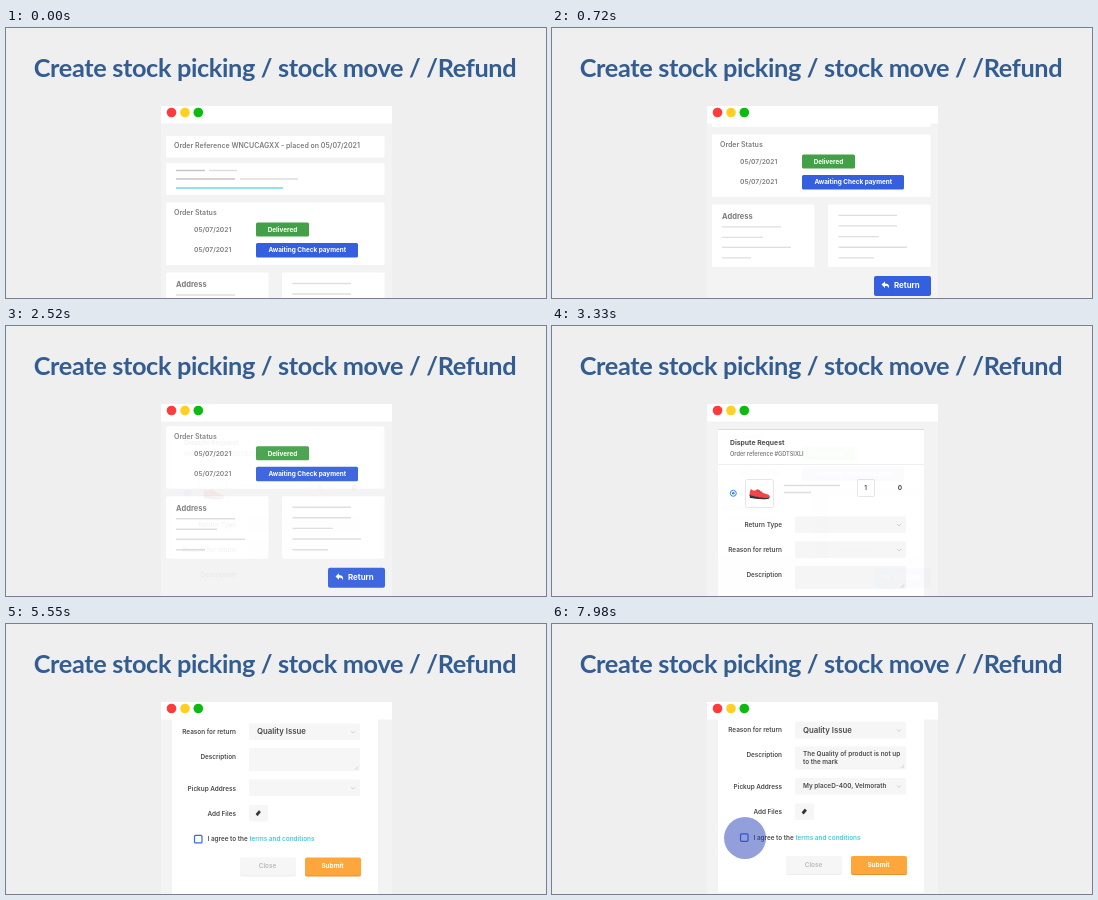
Write an HTML page that moves like this. It is 540 by 270 pixels and loops after 8 s.

```html
<!DOCTYPE html>
<html lang="en">
<head>
<meta charset="utf-8">
<title>Return request</title>
<style>
  html, body { margin: 0; width: 100%; height: 100%; overflow: hidden; background: #efefef; }
  svg { display: block; width: 100%; height: 100%; }
  text { font: 600 6.4px Inter, "Open Sans", sans-serif; fill: #4a4a4a; }
  .title { font: 700 25.3px Lato, sans-serif; letter-spacing: -.35px; fill: #335c91; text-anchor: middle; }
  .grey { fill: #7d7d7d; }
  .head { font-size: 7px; }
  .bold { font-weight: 700; }
  .white { fill: #fff; font-weight: 700; }
  .mid { text-anchor: middle; }
  .end { text-anchor: end; }
  .value { font-size: 7.8px; }
  .card { fill: #fff; }
  .field { fill: #f6f6f6; }
  .box { fill: #fff; stroke: #e6e6e6; }
  .line { stroke: #dedede; stroke-width: 1.4; fill: none; }
  .dark { stroke: #c6c6c6; }
  .thin { stroke: #c9c9c9; stroke-width: .8; fill: none; }
</style>
</head>
<body>
<svg viewBox="0 0 540 270">
  <defs>
    <clipPath id="view"><rect x="155" y="95" width="231" height="175"/></clipPath>
    <path id="chevron" class="thin" d="M-2 -1L0 1L2 -1"/>
  </defs>
  <rect width="540" height="270" fill="#efefef"/>
  <text class="title" x="269" y="49">Create stock picking / stock move / /Refund</text>
  <rect x="155" y="78" width="231" height="192" fill="#f3f3f3"/>

  <g clip-path="url(#view)">
    <g id="order">
      <rect class="card" x="160" y="108" width="218.500" height="21.500" rx="1.500"/>
      <text class="grey head" x="168" y="120.500">Order Reference WNCUCAGXX - placed on 05/07/2021</text>
      <rect class="card" x="160" y="135" width="218.500" height="32" rx="1.500"/>
      <path class="line dark" d="M170 142.500H199M170 151H229"/>
      <path class="line" d="M203 142.500H231M234 151H292"/>
      <path class="line" style="stroke:#6fd3ea" d="M170 160H277"/>

      <rect class="card" x="160" y="174.500" width="218.500" height="62.500" rx="1.500"/>
      <text class="grey head" x="168" y="187.500">Order Status</text>
      <text class="grey" style="font-size:6.7px" x="188" y="204">05/07/2021</text>
      <text class="grey" style="font-size:6.7px" x="188" y="224.500">05/07/2021</text>
      <rect x="250" y="194.500" width="53" height="14" rx="1.500" fill="#43a047"/>
      <text class="white mid" x="276.500" y="204">Delivered</text>
      <rect x="250" y="215" width="102" height="14.500" rx="1.500" fill="#345fde"/>
      <text class="white mid" x="301.300" y="224.500">Awaiting Check payment</text>

      <rect class="card" x="160" y="244.500" width="102.500" height="62.500" rx="1.500"/>
      <text class="grey bold" style="font-size:7.5px" x="170" y="259">Address</text>
      <path class="line" d="M170 267H229M170 277.500H211M170 287.500H239M170 298H199"/>
      <rect class="card" x="276" y="244.500" width="102.500" height="62.500" rx="1.500"/>
      <path class="line" d="M286.500 255.500H345M286.500 266H345M286.500 276.700H327M286.500 287.300H355M286.500 298H322"/>

      <rect x="322" y="316" width="57" height="20" rx="2" fill="#345fde"/>
      <path d="M329.500 324.700L333 321.500V323.500C336.500 323.500 338 325.500 336.500 328.500C336.500 326.500 335.500 326 333 326V328Z" fill="#fff"/>
      <text class="white" style="font-size:7.9px" x="342" y="328.500">Return</text>
    </g>

    <g id="disputeFade" opacity="0">
      <rect x="155" y="95" width="231" height="175" fill="#f3f3f3"/>
      <g id="dispute">
        <rect class="card" x="166" y="103" width="206" height="283" rx="1"/>
        <path d="M166 103.500H372" stroke="#dcdcdc" stroke-width="1.200"/>
        <text class="bold" style="font-size:6.8px" x="178" y="119">Dispute Request</text>
        <text class="grey" style="font-size:5.6px" x="178" y="130">Order reference #GDTSIXLI</text>
        <path d="M166 138.500H372" stroke="#eee"/>

        <circle cx="181.300" cy="167.300" r="3" fill="#fff" stroke="#2f86f0"/>
        <circle cx="181.300" cy="167.300" r="1.300" fill="#2f86f0"/>
        <rect class="box" x="193.500" y="153.500" width="28" height="28" rx="2"/>
        <path d="M197.500 168.500C198 166 198 164 199 163C201 165 203 165 205.500 163C208 165 211 167.500 216 168.500C218 169.500 218 171 217.500 171.500H207L197.500 169.500Z" fill="#ef4444"/>
        <path d="M197.500 169C202 170 206 172 217.700 171.200C217.500 173 215 173.200 211 173.200C205 173 201 172.500 198 172Z" fill="#343038"/>
        <path d="M205.500 165.500L208 164.300M207.300 167L210 165.700" stroke="#b9323a" stroke-width=".7"/>
        <path class="line" d="M232 159.500H288M232 166.500H259"/>
        <rect class="box" x="305.500" y="153.500" width="17" height="17" rx="1.500"/>
        <text class="mid" x="313.500" y="164.300">1</text>
        <text class="mid bold" x="348" y="164.300">0</text>

        <text class="end" x="230" y="200.800">Return Type</text>
        <rect class="field" x="243" y="190.500" width="111" height="16.500" rx="1.500"/>
        <use href="#chevron" x="347" y="199"/>
        <text class="end" x="230" y="225.800">Reason for return</text>
        <rect class="field" x="243" y="215.300" width="111" height="16.700" rx="1.500"/>
        <use href="#chevron" x="347" y="224"/>
        <text class="end" x="230" y="250.800">Description</text>
        <rect class="field" x="243" y="240" width="111" height="23" rx="1.500"/>
        <path class="thin" d="M349 261.500L352 258.500M351 261.500L352 260.500"/>
        <text class="end" x="230" y="282.500">Pickup Address</text>
        <rect class="field" x="243" y="271.500" width="111" height="16.500" rx="1.500"/>
        <use href="#chevron" x="347" y="280"/>
        <text class="end" x="230" y="307.500">Add Files</text>
        <rect class="field" x="243" y="297" width="19" height="16.500" rx="1.500"/>
        <path d="M250.500 306L253 303M251.500 307L254 304" stroke="#333" stroke-width="1.500" stroke-linecap="round"/>

        <g id="values">
          <text class="value" x="251" y="201.300">Refund</text>
          <text class="value" x="251" y="226.300">Quality Issue</text>
          <text x="251" y="249.500">The Quality of product is not up<tspan x="251" dy="7.500">to the mark</tspan></text>
          <text x="251" y="281.700">My placeD-400, Velmorath</text>
        </g>

        <rect x="188.500" y="327.300" width="7.500" height="7.500" rx="1" fill="#fff" stroke="#2f6fe0" stroke-width="1.200"/>
        <text x="201.500" y="333">I agree to the <tspan fill="#3fcbdd">terms and conditions</tspan></text>
        <rect x="234" y="350.500" width="56" height="18" rx="2" fill="#ececec"/>
        <rect x="234" y="349.500" width="56" height="18" rx="2" fill="#f6f6f6"/>
        <text class="mid" style="fill:#b9b9b9" x="261.500" y="360">Close</text>
        <rect x="299" y="350.500" width="56" height="18" rx="2" fill="#e8902c"/>
        <rect x="299" y="349.500" width="56" height="18" rx="2" fill="#fda63c"/>
        <text class="white mid" x="326.500" y="360">Submit</text>
      </g>
    </g>
    <circle id="tap" fill="#2840b8" r="0"/>
  </g>

  <rect x="155" y="78" width="231" height="17.500" fill="#fff"/>
  <circle cx="165.500" cy="84.500" r="4.800" fill="#ff3b3b"/>
  <circle cx="179" cy="84.500" r="4.800" fill="#ffd023"/>
  <circle cx="192.300" cy="84.500" r="4.800" fill="#0bbb0f"/>
</svg>
<script>
  const LOOP = 8000;
  const byId = id => document.getElementById(id);
  const order = byId("order");
  const dispute = byId("dispute"), disputeFade = byId("disputeFade");
  const values = [...byId("values").children];
  const tap = byId("tap");

  const progress = (t, from, to) => Math.min(1, Math.max(0, (t - from) / (to - from)));
  const smooth = p => p * p * (3 - 2 * p);
  const easeOut = p => 1 - (1 - p) ** 2;

  // cubic-bezier(.4, 0, .05, 1)
  function glide(x) {
    let lo = 0, hi = 1;
    for (let i = 0; i < 24; i++) {
      const s = (lo + hi) / 2, r = 1 - s;
      if (1.2 * r * r * s + 0.15 * r * s * s + s ** 3 < x) lo = s; else hi = s;
    }
    return smooth(lo);
  }

  const valueTimes = [[3720, 3960], [3900, 4170], [5790, 6060], [6000, 6300]];
  const taps = [
    { x: 350, y: 252, start: 1950, end: 2430 },
    { x: 193, y: 214, start: 7740, end: 8300 }
  ];

  function draw(t) {
    order.setAttribute("transform", `translate(0 ${-74.3 * glide(progress(t, 0, 1190))})`);
    dispute.setAttribute("transform", `translate(0 ${-117.5 * glide(progress(t, 4778, 5720))})`);
    disputeFade.setAttribute("opacity", smooth(progress(t, 2370, 3420)));

    values.forEach((value, i) => {
      const p = easeOut(progress(t, ...valueTimes[i]));
      value.setAttribute("opacity", p);
      value.setAttribute("transform", `translate(0 ${4 * (1 - p)})`);
    });

    const { x, y, start, end } = taps[t < 4000 ? 0 : 1];
    tap.setAttribute("cx", x);
    tap.setAttribute("cy", y);
    tap.setAttribute("r", 21 * easeOut(progress(t, start, start + 240)));
    tap.setAttribute("opacity", 0.5 * (1 - progress(t, start + 260, end)));
  }

  const begin = performance.now();
  function tick() {
    draw((performance.now() - begin) % LOOP);
    requestAnimationFrame(tick);
  }
  tick();
</script>
</body>
</html>
```
